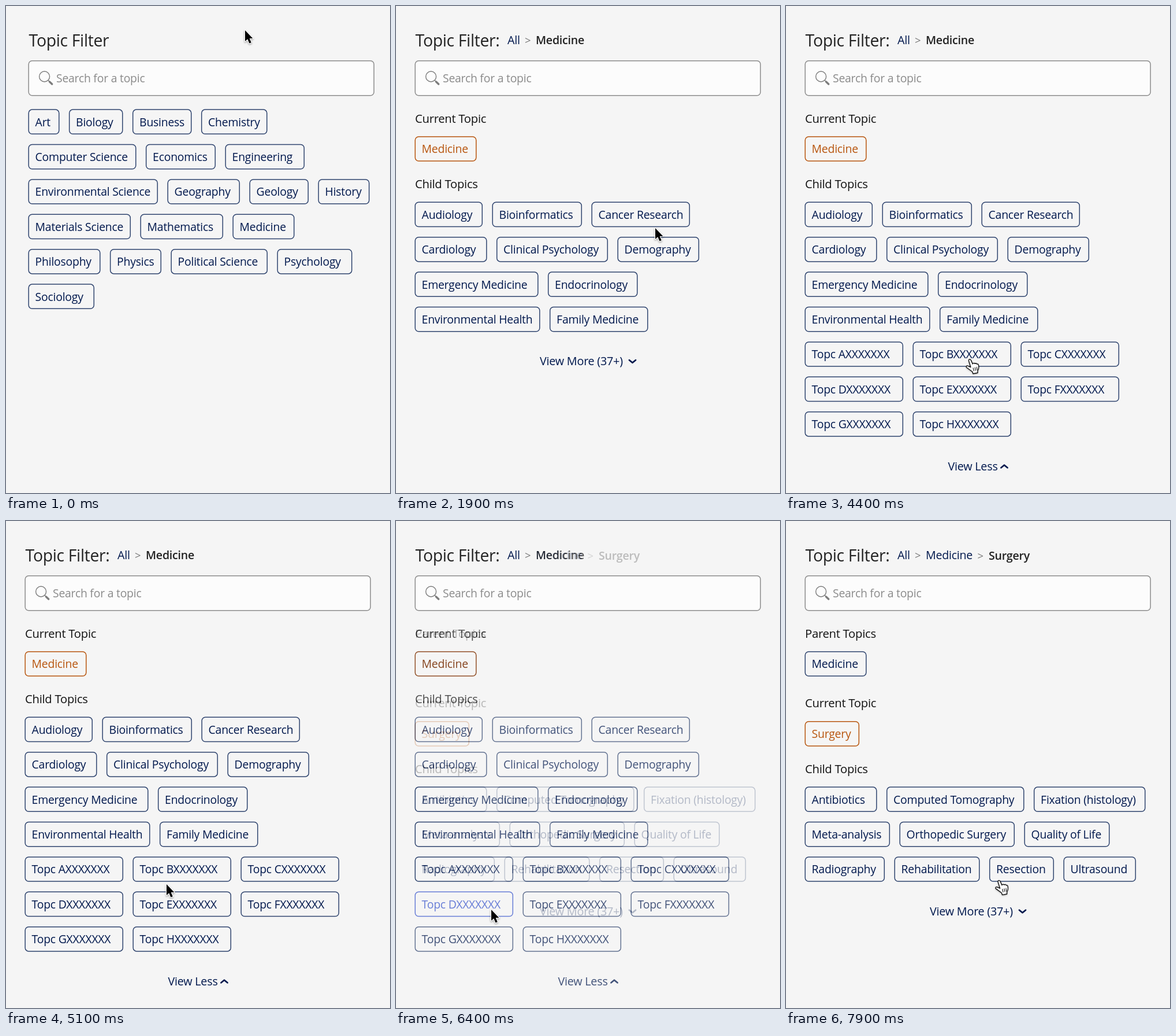
An HTML page with a canvas for the animation above (8 s loop, 665 by 842 pixels).

```html
<!DOCTYPE html>
<html lang="en">
<head>
<meta charset="utf-8">
<title>Topic Filter</title>
<style>
  html, body { margin: 0; width: 100%; height: 100%; overflow: hidden; background: #f5f5f5; }
  canvas { display: block; width: 665px; height: 842px; }
</style>
</head>
<body>
<canvas id="stage" width="665" height="842"></canvas>
<script>
const W = 665, H = 842, LOOP = 8000, STEP = 100;
const FONT = '"Open Sans", "Noto Sans", sans-serif';
const NAVY = '#00184d', BORDER = '#30456f', ORANGE = '#b8560f', PRESSED = '#3452cc', INK = '#222';
const ROW = 60.4, GAP = 17, CHIP_H = 42.5;

const stage = document.getElementById('stage').getContext('2d');
const layer = Object.assign(document.createElement('canvas'), { width: W, height: H }).getContext('2d');

// Lays out rows written as "Label width|Label width" into positioned chips.
function chips(left, top, rows, current = false) {
  return rows.flatMap((row, i) => {
    let x = left;
    return row.split('|').map(item => {
      const cut = item.lastIndexOf(' ');
      const w = Number(item.slice(cut + 1));
      const chip = { label: item.slice(0, cut), x, y: top + i * ROW, w, h: CHIP_H, current };
      x += w + GAP;
      return chip;
    });
  });
}

const children = [
  'Audiology 117|Bioinformatics 155|Cancer Research 170',
  'Cardiology 124.5|Clinical Psychology 192.5|Demography 141',
  'Emergency Medicine 213.5|Endocrinology 155',
  'Environmental Health 216.5|Family Medicine 170'
];
const extra = ['ABC', 'DEF', 'GH'].map(row =>
  [...row].map(c => `Topc ${c}XXXXXXX 170`).join('|'));

const viewMore = y => ({ text: 'View More (37+)', x: 249, y, chevron: 409.5, dir: 1 });

const medicine = (rows, link) => ({
  left: 33,
  crumbs: ['Medicine'],
  headings: [['Current Topic', 201.5], ['Child Topics', 315]],
  chips: [...chips(33, 225.8, ['Medicine 106.5'], true), ...chips(33, 339.2, rows)],
  link
});

const scenes = [
  {
    left: 39, crumbs: [], headings: [],
    chips: chips(39, 179, [
      'Art 53.5|Biology 93|Business 102|Chemistry 114',
      'Computer Science 186.5|Economics 120.5|Engineering 137',
      'Environmental Science 224|Geography 125|Geology 102|History 88.5',
      'Materials Science 177|Mathematics 143|Medicine 106.5',
      'Philosophy 124.5|Physics 88.5|Political Science 167|Psychology 129.5',
      'Sociology 114'
    ])
  },
  medicine(children, viewMore(621)),
  medicine([...children, ...extra], { text: 'View Less', x: 280.5, y: 802.5, chevron: 378, dir: -1 }),
  {
    left: 33,
    crumbs: ['Medicine', 'Surgery'],
    headings: [['Parent Topics', 201.5], ['Current Topic', 322], ['Child Topics', 435.5]],
    chips: [
      ...chips(33, 225.8, ['Medicine 106.5']),
      ...chips(33, 346.7, ['Surgery 94'], true),
      ...chips(33, 460, [
        'Antibiotics 124.5|Computed Tomography 238|Fixation (histology) 193',
        'Meta-analysis 147|Orthopedic Surgery 199|Quality of Life 147.5',
        'Radiography 138|Rehabilitation 147.5|Resection 111.5|Ultrasound 125'
      ])
    ],
    link: viewMore(681.5)
  }
];

// Each dissolve leads from scene i to scene i + 1.
const dissolves = [
  { start: 1550, press: 'none' },
  { start: 4050, press: 'none' },
  { start: 6350, press: 'Topc DXXXXXXX' }
];
const FADE = 350, PRESS_LEAD = 150;

// Pointer stops: time, x, y.
const pointerPath = [
  [0, 414, 42], [1050, 446, 404], [1200, 445, 400], [1400, 449, 384], [2350, 449, 384],
  [3500, 260, 577], [3900, 320, 612], [4350, 320, 612], [4800, 300, 621], [4950, 300, 621],
  [5100, 278, 628], [6200, 165, 672], [6750, 165, 672], [7600, 378, 621], [7850, 370, 623]
];

const mix = (a, b, k) => a + (b - a) * k;
const smooth = k => k * k * (3 - 2 * k);
const easeOut = k => 1 - (1 - k) ** 2;

function text(g, str, x, y, size, color, weight = 400) {
  g.font = `${weight} ${size}px ${FONT}`;
  g.letterSpacing = `${-0.012 * size}px`;
  g.fillStyle = color;
  g.fillText(str, x, y);
}

function box(g, x, y, w, h, color, fill) {
  g.beginPath();
  g.roundRect(x, y, w, h, 6);
  if (fill) { g.fillStyle = fill; g.fill(); }
  g.strokeStyle = color;
  g.lineWidth = 1.5;
  g.stroke();
}

function line(g, color, width, ...points) {
  g.beginPath();
  points.forEach(([x, y]) => g.lineTo(x, y));
  g.strokeStyle = color;
  g.lineWidth = width;
  g.stroke();
}

function drawSearch(g, left) {
  box(g, left + 0.2, 94.7, 598, 60, '#8c8c8c', '#fcfcfc');
  g.beginPath();
  g.arc(left + 27.6, 122, 9, 0, Math.PI * 2);
  g.strokeStyle = '#7c7c7c';
  g.lineWidth = 1.4;
  g.stroke();
  line(g, '#7c7c7c', 1.5, [left + 34, 128.5], [left + 37, 131.5]);
  line(g, '#7c7c7c', 3.4, [left + 36.5, 131], [left + 40.7, 135]);
  text(g, 'Search for a topic', left + 48, 132, 19.4, '#8a8a8a');
}

function drawCrumbs(g, names) {
  if (!names.length) return;
  text(g, 'All', 193, 66, 19.8, NAVY);
  names.forEach((name, i) => {
    const last = i === names.length - 1;
    text(g, '>', 223 + i * 108.5, 66 + i * 0.5, 18.5, '#777');
    text(g, name, 242 + i * 109, 66 + i, 19.6, last ? INK : NAVY, last ? 600 : 400);
  });
}

function drawScene(g, scene, pressed) {
  g.fillStyle = '#f5f5f5';
  g.fillRect(0, 0, W, H);
  g.lineCap = g.lineJoin = 'round';
  text(g, scene.crumbs.length ? 'Topic Filter:' : 'Topic Filter', scene.left + 0.5, 70, 28.4, INK);
  drawCrumbs(g, scene.crumbs);
  drawSearch(g, scene.left);
  for (const [title, y] of scene.headings) text(g, title, scene.left, y, 20.2, '#111');
  for (const c of scene.chips) {
    const accent = c.current ? ORANGE : c.label === pressed ? PRESSED : null;
    box(g, c.x + 0.2, c.y + 0.1, c.w - 0.9, c.h - 0.3, accent || BORDER);
    text(g, c.label, c.x + 11.6, c.y + 28.6, 19.4, accent || NAVY);
  }
  if (scene.link) {
    const { text: label, x, y, chevron, dir } = scene.link;
    const cy = y - 6.5;
    text(g, label, x, y, 19.8, NAVY);
    line(g, NAVY, 2.8, [chevron - 5.5, cy - 2.3 * dir], [chevron, cy + 2.3 * dir], [chevron + 5.5, cy - 2.3 * dir]);
  }
}

function pointerAt(t) {
  const i = pointerPath.findIndex(p => p[0] > t);
  if (i < 0) return pointerPath.at(-1).slice(1);
  const [t0, x0, y0] = pointerPath[i - 1], [t1, x1, y1] = pointerPath[i];
  const k = smooth((t - t0) / (t1 - t0));
  return [mix(x0, x1, k), mix(y0, y1, k)];
}

function isClickable(scene, x, y) {
  const inside = r => x >= r.x && x <= r.x + r.w && y >= r.y && y <= r.y + r.h;
  const link = scene.link;
  return scene.chips.some(inside) ||
    !!link && inside({ x: link.x, y: link.y - 20, w: link.chevron + 8 - link.x, h: 26 });
}

const arrow = new Path2D('M0 0V19L4.3 15.2L7.4 22.6L10.8 21.2L7.7 13.9H13.4Z');
const hand = new Path2D('M-2.8 1.5Q-3.2-1.6-1.2-1.6Q.4-1.7 1.3 .6L4 6.6Q6 3.8 7.8 6.2' +
  'Q10 4.3 11.3 6.9Q13.6 5.8 14.2 9Q15.2 14 12.6 18L12.6 22L4.6 23.4L3.4 20' +
  'Q-2 16-7 12.4Q-7.8 8.9-4 10L.6 12.2Z');
const knuckles = new Path2D('M4.8 13.5L6 18.5M8 12.8L8.9 17.8M11 12L11.6 17');

function drawPointer(g, x, y, isHand) {
  g.save();
  g.translate(x, y);
  g.lineJoin = 'round';
  g.shadowColor = 'rgba(0,0,0,.35)';
  g.shadowBlur = 3;
  g.shadowOffsetY = 1.5;
  g.strokeStyle = g.fillStyle = '#fff';
  g.lineWidth = 2.4;
  const shape = isHand ? hand : arrow;
  if (isHand) g.fill(shape); else g.stroke(shape);
  g.shadowColor = 'transparent';
  if (isHand) {
    g.strokeStyle = '#111';
    g.lineWidth = 1.4;
    g.stroke(shape);
    g.lineWidth = 1.1;
    g.stroke(knuckles);
  } else {
    g.fillStyle = '#000';
    g.fill(shape);
  }
  g.restore();
}

function render(t) {
  const index = dissolves.filter(d => t >= d.start + FADE).length;
  const next = dissolves[index];
  const pressed = next && t >= next.start - PRESS_LEAD ? next.press : null;
  const fading = !!next && t > next.start;
  drawScene(stage, scenes[index], pressed);
  if (fading) {
    drawScene(layer, scenes[index + 1]);
    stage.globalAlpha = easeOut((t - next.start) / FADE);
    stage.drawImage(layer.canvas, 0, 0);
    stage.globalAlpha = 1;
  }
  const [x, y] = pointerAt(t);
  drawPointer(stage, x, y, !fading && isClickable(scenes[index], x, y));
}

const began = performance.now();
function tick() {
  const t = (performance.now() - began) % LOOP;
  render(Math.floor(t / STEP) * STEP);
  requestAnimationFrame(tick);
}
tick();
</script>
</body>
</html>
```
